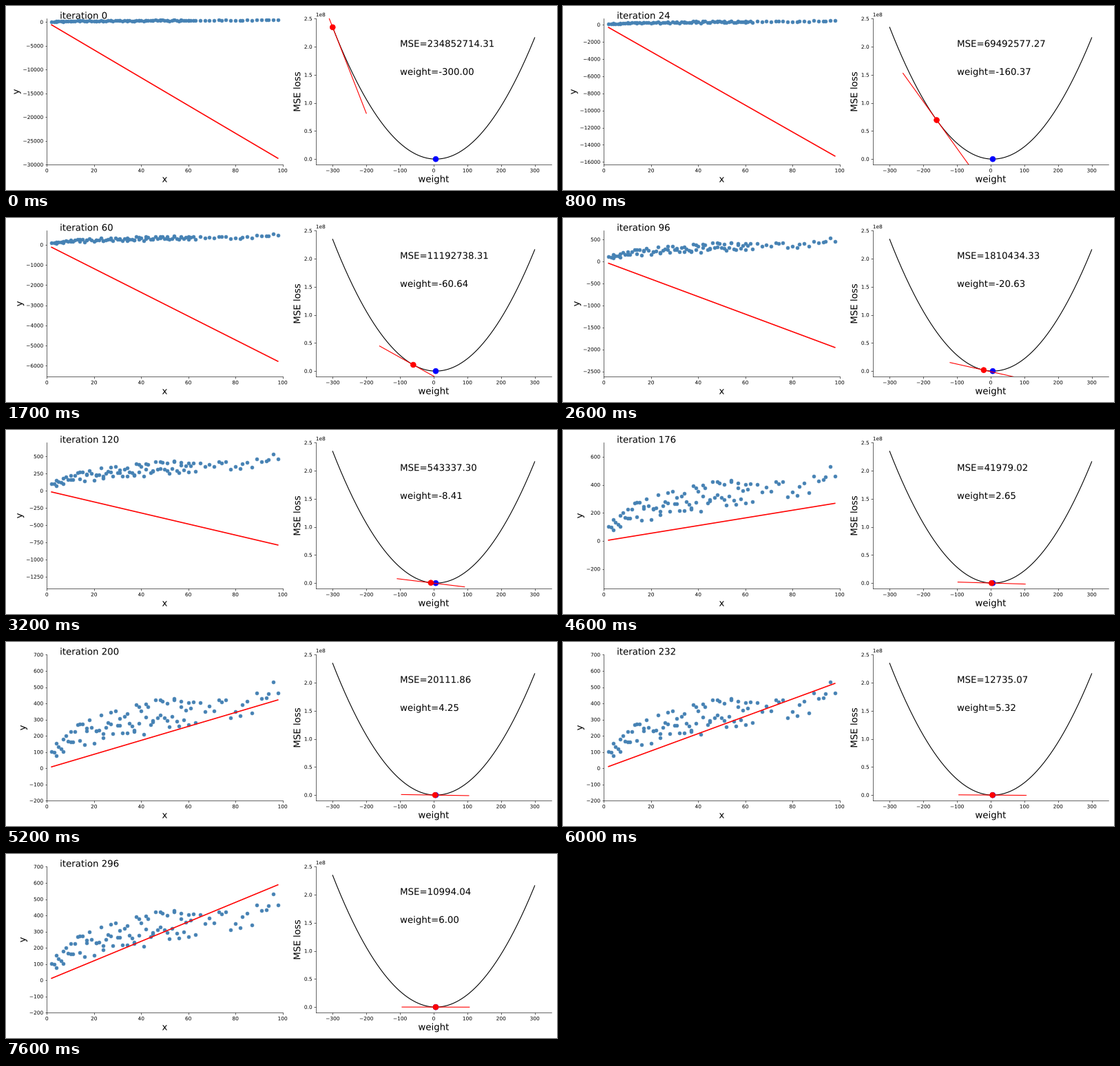
These frames come from a looping animation (800 px wide and 267 px high, 7.7 s). A matplotlib script:

```python
import numpy as np
import matplotlib.pyplot as plt
from matplotlib import patheffects
from matplotlib.animation import FuncAnimation

W, H, DPI = 800, 267, 80
K = 2 / 3  # overall scale of type and strokes

plt.rcParams.update({
    "font.family": "DejaVu Sans",
    "font.size": 10 * K,
    "text.hinting": "none",
    "path.effects": [patheffects.Normal()],  # text as outlines, not pixel-snapped
    "axes.labelsize": 18 * K,
    "axes.labelpad": 4 * K,
    "axes.linewidth": 0.8 * K,
    "axes.spines.top": False,
    "axes.spines.right": False,
    "lines.linewidth": 1.5 * K,
    "lines.markersize": 10.5 * K,
    "lines.markeredgewidth": K,
})
for axis, pad in (("xtick", 4.2), ("ytick", 3.5)):
    plt.rcParams.update({
        f"{axis}.major.size": 3.5 * K,
        f"{axis}.major.pad": pad * K,
        f"{axis}.major.width": 0.8 * K,
    })

# Least squares through the origin: loss = A * (w - BEST)^2 + FLOOR
A = 2505.27            # mean of x squared
FLOOR = 10923.6305     # loss at the best weight
START_W, START_LOSS = -300, 234852714.31
RATE = 5e-6
SHRINK = 1 - 2 * A * RATE
GAP = np.sqrt((START_LOSS - FLOOR) / A)
BEST = START_W + GAP

STEPS = [0, 1, 2, *range(4, 300, 4)]


def weight_at(n):
    return BEST - GAP * SHRINK ** n


def loss_at(n):
    return FLOOR + (START_LOSS - FLOOR) * SHRINK ** (2 * n)


def loss(w):
    return A * (w - BEST) ** 2 + FLOOR


def sample(count=100, seed=4):
    """Points around a flattening trend, thinning out to the right."""
    rng = np.random.default_rng(seed)
    x = np.interp(np.linspace(0, 1, count), [0, 0.38, 0.8, 1], [2, 31, 62, 98])
    x = np.round(x)
    spread = 105 * (1 - np.exp(-x / 8))
    return x, 62 * x ** 0.43 + spread * rng.uniform(-1, 1, count)


fig = plt.figure(figsize=(W / DPI, H / DPI), dpi=DPI, facecolor="white")


def panel(left, xlabel, ylabel):
    ax = fig.add_axes([left / W, 36.7 / H, 342.3 / W, 211.8 / H])
    ax.set(xlabel=xlabel, ylabel=ylabel)
    return ax


xs, ys = sample()
x_ends = np.array([xs.min(), xs.max()])

ax_fit = panel(59.3, "x", "y")
ax_fit.set_xlim(0, 100)
ax_fit.scatter(xs, ys, s=42 * K * K, color="steelblue", linewidth=K)
fit, = ax_fit.plot([], [], color="red", lw=2.2 * K)
title = ax_fit.text(0.055, 1, "", fontsize=18 * K, transform=ax_fit.transAxes)

ax_loss = panel(449.8, "weight", "MSE loss")
ax_loss.set(xlim=(-350, 350), ylim=(-0.1e8, 2.5e8))
grid = np.linspace(-300, 300, 301)
ax_loss.plot(grid, loss(grid), color="black")
ax_loss.plot(BEST, FLOOR, "o", color="blue")
tangent, = ax_loss.plot([], [], color="red")
dot, = ax_loss.plot([], [], "o", color="red")
loss_text = ax_loss.text(-100, 2e8, "", fontsize=18 * K)
weight_text = ax_loss.text(-100, 1.5e8, "", fontsize=18 * K)


def draw(i):
    n = STEPS[i]
    w, mse = weight_at(n), loss_at(n)

    fit.set_data(x_ends, weight_at(n + 1) * x_ends)
    ax_fit.set_ylim(min(-200, w * x_ends[1] - 600), 700)
    title.set_text(f"iteration {n}")

    reach = np.array([-100, 100])
    tangent.set_data(w + reach, mse + 2 * A * (w - BEST) * reach)
    dot.set_data([w], [mse])
    loss_text.set_text(f"MSE={mse:.2f}")
    weight_text.set_text(f"weight={w:.2f}")
    return fit, title, tangent, dot, loss_text, weight_text


anim = FuncAnimation(fig, draw, frames=len(STEPS), interval=100, repeat=True)
plt.show()
```
